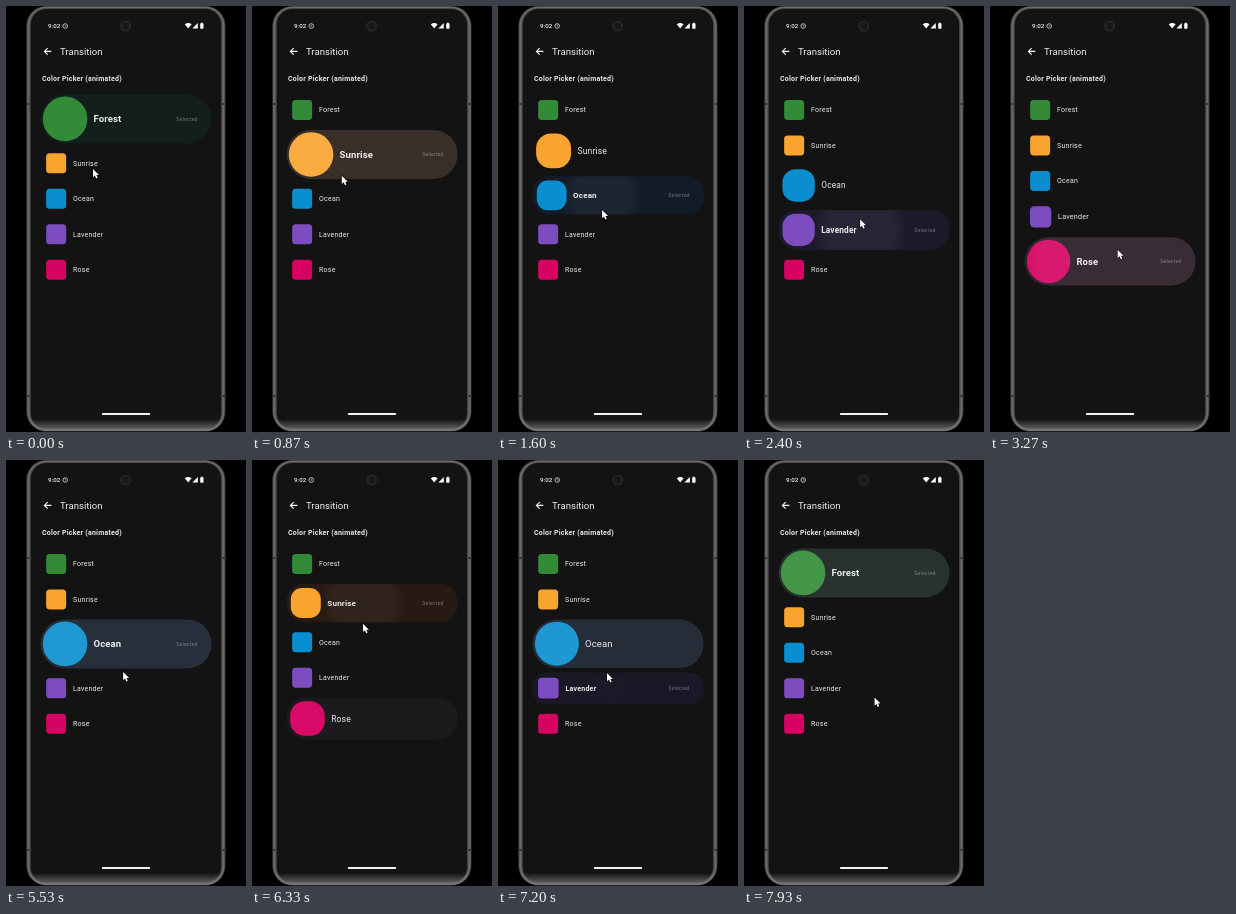
Animation, 240 px wide and 426 px high, one loop 8000 ms. Source, as an HTML page with a canvas:

```html
<!DOCTYPE html>
<html lang="en">
<head>
<meta charset="utf-8">
<title>Color picker transition</title>
<style>
  html, body { margin: 0; width: 100%; height: 100%; overflow: hidden; background: #000; }
  canvas { display: block; width: 240px; height: 426px; }
</style>
</head>
<body>
<canvas id="stage"></canvas>
<script>
const LOOP = 8000;
const canvas = document.getElementById('stage');
const ctx = canvas.getContext('2d');
const dpr = window.devicePixelRatio || 1;
canvas.width = 240 * dpr;
canvas.height = 426 * dpr;

// tapY: where the pointer touches the row
const rows = [
  { name: 'Forest', color: '#338b37', tint: '#131f1c', tapY: 124 },
  { name: 'Sunrise', color: '#f9a42f', tint: '#271a13', tapY: 163 },
  { name: 'Ocean', color: '#0a8ecf', tint: '#131b29', tapY: 204 },
  { name: 'Lavender', color: '#7d4dbf', tint: '#1c192b', tapY: 213 },
  { name: 'Rose', color: '#d60362', tint: '#261721', tapY: 250 }
];

// Runs of evenly spaced taps; the pointer drifts sideways by dx per tap
const runs = [
  { start: -3000, x: 87, order: [0] },
  { start: 640, x: 87, order: [1] },
  { start: 1566, step: 792, x: 104, dx: 12, order: [2, 3, 4] },
  { start: 4570, step: 345, x: 120, dx: -1, order: [0, 1, 2, 3, 4] },
  { start: 6295, step: 450, x: 111, dx: -1, order: [1, 2, 3, 0] },
  { start: LOOP, x: 133, order: [4] }
];
const taps = runs.flatMap(({ start, step = 0, x, dx = 0, order }) =>
  order.map((row, i) => ({ time: start + step * i, row, x: x + dx * i, y: rows[row].tapY })));

const clamp = v => Math.max(0, Math.min(1, v));
const mix = (a, b, p) => a + (b - a) * p;
const smooth = u => u * u * (3 - 2 * u);

// Critically damped spring, stiffness 1500
function spring(ms) {
  const x = Math.max(0, ms) * Math.sqrt(1500) / 1000;
  return 1 - (1 + x) * Math.exp(-x);
}

function pointerAt(t) {
  const i = Math.max(1, taps.findLastIndex(tap => tap.time <= t));
  const from = taps[i];
  const to = taps[i + 1] || from;
  const travel = Math.min(900, to.time - from.time) || 1;
  const e = smooth(clamp((t - from.time) / travel));
  return [mix(from.x, to.x, e), mix(from.y, to.y, e)];
}

function box(x, y, w, h, r) {
  ctx.beginPath();
  ctx.roundRect(x, y, w, h, r);
}

function fillBox(x, y, w, h, r, color) {
  box(x, y, w, h, r);
  ctx.fillStyle = color;
  ctx.fill();
}

function circle(x, y, r, color) {
  ctx.beginPath();
  ctx.arc(x, y, r, 0, 7);
  ctx.fillStyle = color;
  ctx.fill();
}

function stroke(path, color, width) {
  ctx.strokeStyle = color;
  ctx.lineWidth = width;
  ctx.stroke(new Path2D(path));
}

function fillPath(path, color) {
  ctx.fillStyle = color;
  ctx.fill(new Path2D(path));
}

function text(str, x, y, size, weight, spacing, color) {
  ctx.font = `${weight} ${size}px Roboto, sans-serif`;
  ctx.letterSpacing = spacing + 'px';
  ctx.fillStyle = color;
  ctx.fillText(str, x, y);
}

function drawPhone() {
  ctx.fillStyle = '#000';
  ctx.fillRect(0, 0, 240, 426);

  const shell = (inset, color) =>
    fillBox(20.3 + inset, inset * 0.7, 199.2 - 2 * inset, 425.6 - inset * 1.4, 20 - inset, color);
  shell(0, '#3a3a3a');
  shell(1, '#6c6c6c');
  shell(3, '#4a4a4a');
  for (const y of [97, 389]) {
    ctx.fillStyle = '#333';
    ctx.fillRect(20.3, y, 3, 2);
    ctx.fillRect(216.5, y, 3, 2);
  }
  shell(4.4, '#131313');

  // Light along the bottom edge
  const glow = ctx.createLinearGradient(0, 413, 0, 425);
  glow.addColorStop(0, 'rgba(120,120,120,0)');
  glow.addColorStop(1, 'rgba(120,120,120,.9)');
  ctx.save();
  box(21, 0, 198, 425, 19);
  ctx.clip();
  ctx.fillStyle = glow;
  ctx.fillRect(20, 413, 200, 13);
  ctx.restore();

  circle(119.7, 20, 5.6, '#242424');
  circle(119.7, 20, 3.2, '#171717');
}

function drawHeader() {
  text('9:02', 42, 22.3, 6.2, 500, 0, '#eee');
  ctx.beginPath();
  ctx.arc(59.2, 20, 2.3, 0, 7);
  ctx.strokeStyle = '#ddd';
  ctx.lineWidth = 0.8;
  ctx.stroke();
  stroke('M59.2 18.7V20.2H60', '#ddd', 0.6);
  fillPath('M178.8 18.2Q182.2 15.8 185.6 18.2L182.2 22.6Z', '#fff');
  fillPath('M191.8 17V22.6H186.4Z', '#fff');
  fillBox(194.2, 17.3, 3.3, 5.4, 0.6, '#fff');
  ctx.fillRect(195.1, 16.7, 1.5, 1);

  stroke('M45.4 45.4H38.4M41.7 42.1L38.4 45.4L41.7 48.7', '#f4f4f4', 1.2);
  text('Transition', 54, 48.9, 9.6, 400, 0, '#f0f0f0');
  text('Color Picker (animated)', 36, 74.5, 7, 700, 0.22, '#e8e8e8');
  fillBox(95.8, 406.9, 48.4, 2, 1, '#f2f2f2');
}

function drawRipple(age, x, y, strength) {
  const alpha = 0.09 * strength * clamp(age / 75) * clamp((600 - age) / 150);
  if (alpha <= 0) return;
  const radius = mix(14, 190, clamp(age / 225));
  const glow = ctx.createRadialGradient(x, y, 0, x, y, radius);
  glow.addColorStop(0, `rgba(255,255,255,${alpha})`);
  glow.addColorStop(0.7, `rgba(255,255,255,${alpha})`);
  glow.addColorStop(1, 'rgba(255,255,255,0)');
  circle(x, y, radius, glow);
}

function drawRows(t) {
  const index = taps.findLastIndex(tap => tap.time <= t);
  const current = taps[index];
  const previous = taps[index - 1];
  const grow = spring(t - current.time);
  let y = 88.4;

  rows.forEach((row, i) => {
    const active = i === current.row;
    const p = active ? grow : i === previous?.row ? 1 - grow : 0;
    const size = mix(20, 44.6, p);
    const pad = mix(5.55, 2.2, p);
    const height = size + 2 * pad;
    const middle = y + height / 2;
    const left = 34.6 + pad;

    ctx.save();
    box(34.6, y, 171, height, mix(12.5, 24.5, p));
    ctx.clip();
    ctx.globalAlpha = active ? clamp(0.8 + p) : p ** 4;
    ctx.fillStyle = row.tint;
    ctx.fillRect(34, y - 1, 173, height + 2);
    ctx.globalAlpha = 1;

    fillBox(left, y + pad, size, size, mix(3.6, 22.3, p), row.color);
    const fontSize = mix(7, 9.6, p);
    text(row.name, left + size + mix(6.9, 6.1, p), middle + fontSize * 0.355, fontSize,
      active ? 700 : 400, mix(0.22, 0.1, p), '#ebebeb');
    if (active) text('Selected', 170.2, middle + 1.9, 5.2, 400, 0.2, 'rgba(255,255,255,.38)');

    const tap = taps.findLast(({ row, time }) => row === i && time <= t);
    if (tap) drawRipple(t - tap.time, tap.x, middle, active ? 1 : p * p);
    ctx.restore();
    y += height + 4.4;
  });
}

function drawPointer(t) {
  const arrow = 'M0 0V8.2L1.9 6.5L3.2 9.5L4.7 8.8L3.4 6H6Z';
  ctx.save();
  ctx.translate(...pointerAt(t));
  ctx.lineJoin = 'round';
  stroke(arrow, '#000', 1.1);
  fillPath(arrow, '#fff');
  ctx.restore();
}

const origin = performance.now();

function render() {
  const t = (performance.now() - origin) % LOOP;
  ctx.setTransform(dpr, 0, 0, dpr, 0, 0);
  drawPhone();
  drawHeader();
  drawRows(t);
  drawPointer(t);
  requestAnimationFrame(render);
}
render();
</script>
</body>
</html>
```
